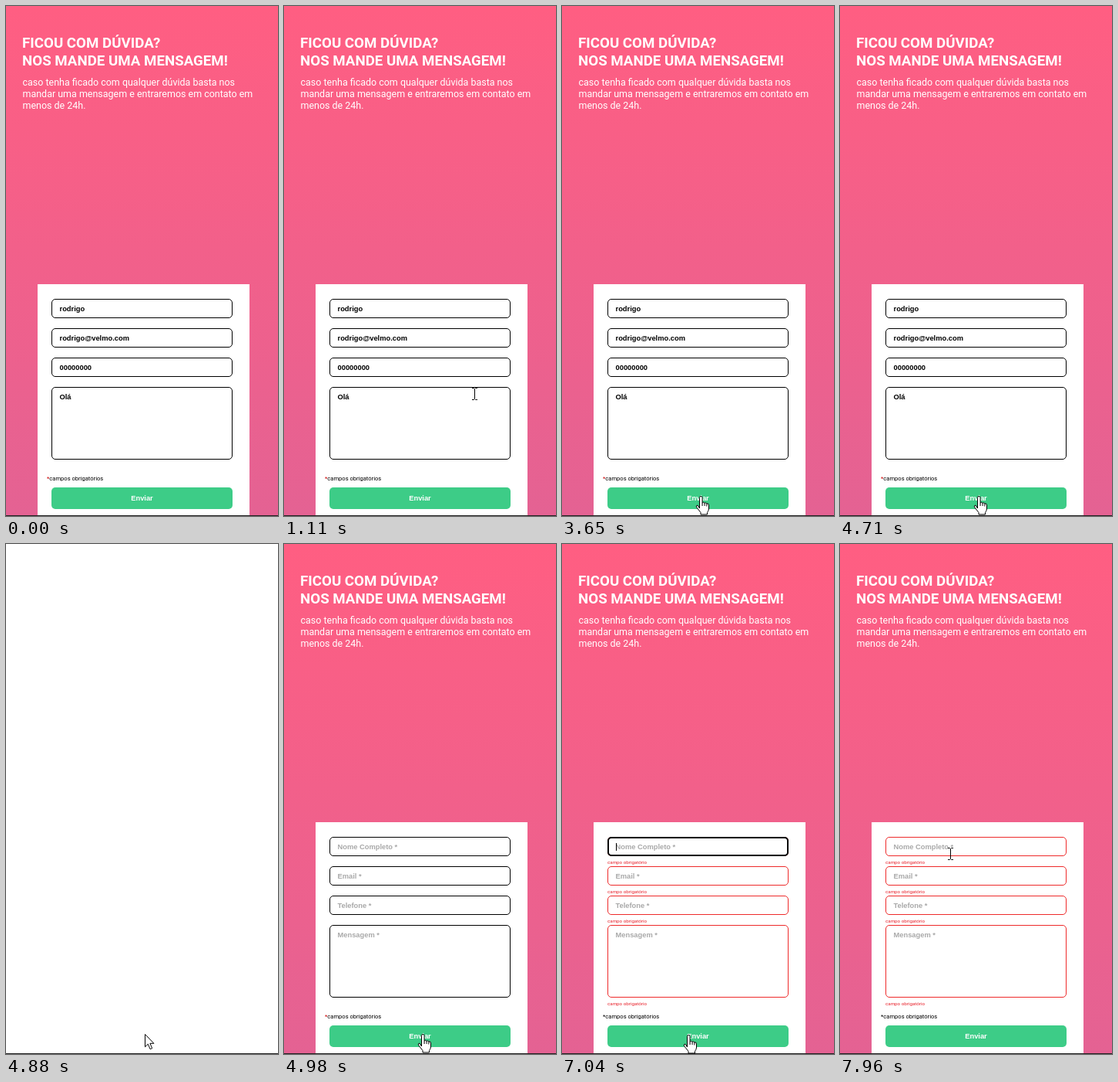
Write an HTML page that moves like this. It is 353 px wide and 660 px high and loops after 8 s.

```html
<!DOCTYPE html>
<html lang="pt-BR">
<head>
<meta charset="utf-8">
<title>Contato</title>
<style>
  html, body { margin: 0; width: 100%; height: 100%; overflow: hidden; }
  svg { display: block; width: 353px; height: 660px; font-family: Roboto, sans-serif; }
  .title { font-size: 18.72px; font-weight: 700; fill: #fff; }
  .intro { font-size: 12.48px; fill: #fff; }
  .field { fill: #fff; stroke: #000; }
  .invalid .field { stroke: #ee2b2b; }
  .input { font: bold 9.33px "Liberation Sans", Arial, sans-serif; }
  .hint { fill: #a9a9a9; }
  .error { font-size: 6.24px; fill: #e8202a; }
  .note { font-size: 7.6px; }
  .note tspan { fill: #c00; }
  .invalid .note tspan { fill: #000; }
</style>
</head>
<body>
<svg viewBox="0 0 353 660">
  <defs>
    <linearGradient id="sky" x2="0" y2="1">
      <stop stop-color="#ff5e82"/>
      <stop offset="1" stop-color="#e46293"/>
    </linearGradient>
  </defs>
  <rect width="353" height="660" fill="url(#sky)"/>
  <g class="title">
    <text x="21" y="54">FICOU COM DÚVIDA?</text>
    <text x="21" y="77">NOS MANDE UMA MENSAGEM!</text>
  </g>
  <g class="intro">
    <text x="21.5" y="103">caso tenha ficado com qualquer dúvida basta nos</text>
    <text x="21.5" y="118">mandar uma mensagem e entraremos em contato em</text>
    <text x="21.5" y="133">menos de 24h.</text>
  </g>
  <rect x="41" y="360" width="275" height="299" fill="#fff"/>
  <g id="form">
    <g id="fields"></g>
    <g id="focus">
      <rect x="60" y="380" width="233" height="23" rx="4" fill="none" stroke="#000" stroke-width="2"/>
      <path id="caret" d="M70.5 387v10" stroke="#000"/>
    </g>
    <text class="note" x="53" y="614"><tspan>*</tspan>campos obrigatórios</text>
    <rect x="59" y="623" width="235" height="28" rx="5" fill="#3dcc87"/>
    <text class="input" x="176.5" y="640" text-anchor="middle" fill="#fff">Enviar</text>
  </g>
  <rect id="blank" width="353" height="660" fill="#fff"/>
  <rect y="659" width="353" height="1" fill="#222"/>
  <g id="cursor" fill="#fff" stroke="#000">
    <path id="arrow" d="M.5.5v16.3l3.8-3.6 2.8 6.5 2.6-1.1-2.8-6.3h5z"/>
    <path id="hand" d="M-1.5 16V2.3a1.8 1.8 0 0 1 3.6 0V9q1.6-1.4 3 .3 1.7-1 2.8.6 2.6-.6 2.6 2V17q-.4 2.5-2 4.5V24H0v-2.5l-5.5-7q-.8-2.3 1.5-2.4zM2.1 9v4M5.1 9.4V13M7.9 10v3.5"/>
    <path id="beam" fill="none" d="M-3-7.5H-.5L.5-6.5 1.5-7.5H4M.5-6.5v13M-3 7.5H-.5L.5 6.5 1.5 7.5H4"/>
  </g>
</svg>
<script>
const $ = id => document.getElementById(id);
const show = (id, on) => $(id).style.display = on ? '' : 'none';

const fields = [
  { y: 379, h: 25, value: 'rodrigo', hint: 'Nome Completo *' },
  { y: 417, h: 25, value: 'rodrigo@velmo.com', hint: 'Email *' },
  { y: 455, h: 25, value: '00000000', hint: 'Telefone *' },
  { y: 493, h: 94, value: 'Olá', hint: 'Mensagem *' }
];
const textsOf = make => fields.map(make).join('');
$('fields').innerHTML =
  textsOf(f => `<rect class="field" x="59.5" y="${f.y + .5}" width="234" height="${f.h - 1}" rx="4.5"/>`) +
  `<g id="values" class="input">${textsOf(f => `<text x="69.5" y="${f.y + 16}">${f.value}</text>`)}</g>` +
  `<g id="hints" class="input hint">${textsOf(f => `<text x="69.5" y="${f.y + 16}">${f.hint}</text>`)}</g>` +
  `<g id="errors" class="error">${textsOf(f => `<text x="59" y="${f.y + f.h + 10}">campo obrigatório</text>`)}</g>`;

// Pointer path: time, x, y
const path = [
  [680, 296, 654], [1460, 211, 391], [2399, 211, 391], [2400, 210, 391],
  [2570, 210, 391], [3360, 182, 587], [3410, 182, 588], [3650, 180, 634],
  [5280, 180, 634], [5900, 180, 601], [6300, 180, 601], [6480, 178, 525],
  [6720, 159, 626], [6810, 164, 635], [7330, 164, 635], [7720, 140, 410],
  [7890, 140, 410], [7960, 143, 401]
];

function pointer(t) {
  const next = path.findIndex(p => p[0] > t);
  if (next < 0) return path[path.length - 1].slice(1);
  const [t0, x0, y0] = path[next - 1], [t1, x1, y1] = path[next];
  const u = (t - t0) / (t1 - t0), e = u * u * (3 - 2 * u);
  return [Math.round(x0 + (x1 - x0) * e), Math.round(y0 + (y1 - y0) * e)];
}

function pointerShape(x, y, blank) {
  if (blank || x < 59 || x > 294) return 'arrow';
  if (y >= 623 && y <= 651) return 'hand';
  return fields.some(f => y >= f.y && y <= f.y + f.h) ? 'beam' : 'arrow';
}

function draw(t) {
  const within = (a, b) => t >= a && t < b;
  const filled = t < 4980, invalid = t >= 6990, blank = within(4880, 4980);
  show('values', filled);
  show('hints', !filled);
  show('errors', invalid);
  show('focus', within(4590, 4710) || within(6990, 7100));
  show('caret', !filled);
  show('blank', blank);
  $('form').classList.toggle('invalid', invalid);

  show('cursor', t >= 680);
  if (t < 680) return;
  const [x, y] = pointer(t), shape = pointerShape(x, y, blank);
  $('cursor').setAttribute('transform', `translate(${x} ${y})`);
  for (const id of ['arrow', 'hand', 'beam']) show(id, id === shape);
}

const start = performance.now();
function tick() {
  draw((performance.now() - start) % 8000);
  requestAnimationFrame(tick);
}
tick();
</script>
</body>
</html>
```
